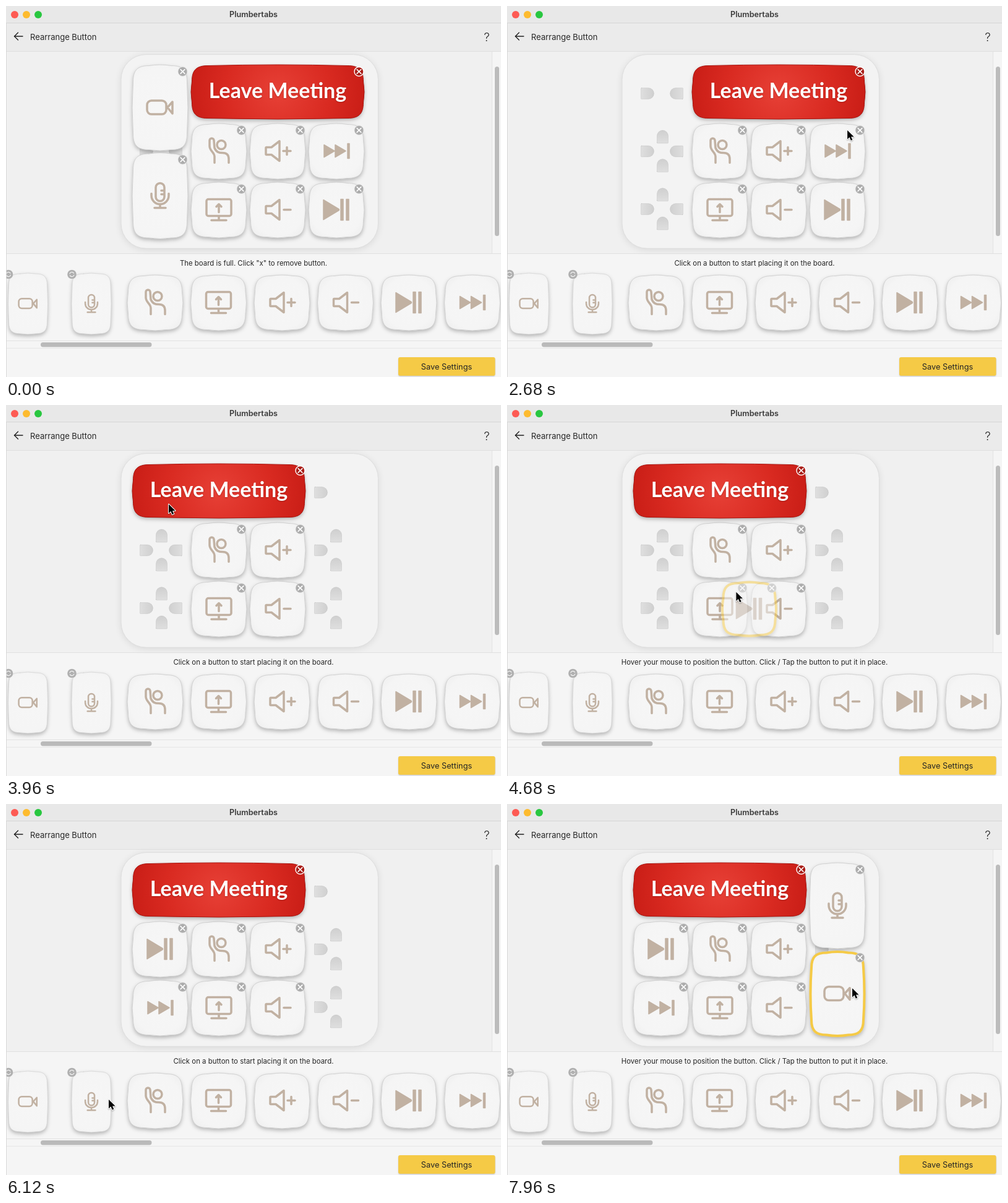
Write an HTML page with a canvas that moves like this. It is 800 by 600 pixels and loops after 8000 ms.

```html
<!DOCTYPE html>
<html lang="en">
<head>
<meta charset="utf-8">
<title>Plumbertabs</title>
<style>
  html, body { margin: 0; width: 100%; height: 100%; overflow: hidden; }
  canvas { display: block; width: 800px; height: 600px; }
</style>
</head>
<body>
<canvas id="stage" width="800" height="600"></canvas>
<script>
const stage = document.getElementById('stage').getContext('2d');
const overlay = new OffscreenCanvas(800, 600).getContext('2d');
let ctx = stage;

const LOOP = 8000, STEP = 95, BOARD_X = 204, BOARD_Y = 95;
const TAN = '#c1b1a2', YELLOW = '#f5ca46';
const UI = 'Inter, sans-serif';

const SPEAKER = 'M-18-6H-10L3-16V16L-10 6H-18a1 1 0 0 1-1-1V-5a1 1 0 0 1 1-1z';
const ICONS = {
  camera: 'M-14-11H3a7 7 0 0 1 7 7V4a7 7 0 0 1-7 7H-14a7 7 0 0 1-7-7V-4a7 7 0 0 1 7-7zM12 0L20-9V10z',
  mic: 'M-7-13a7 7 0 0 1 14 0V2a7 7 0 0 1-14 0zM-14-3V0a14 14 0 0 0 28 0V-3M0 14V20M-9 20H9M2-8H6M2-2H6',
  hand: 'M-15-17V-8C-15 0-7 2-7 9V19M-15-17a3.5 3.5 0 0 1 7 0L-7-5C-4 2 0 3 6 3 13 3 16 7 16 13V19' +
        'M11-10a7 7 0 1 1-14 0 7 7 0 1 1 14 0',
  screen: 'M-17-17H17a3 3 0 0 1 3 3V7a3 3 0 0 1-3 3H-17a3 3 0 0 1-3-3V-14a3 3 0 0 1 3-3z' +
          'M0 10V17M-12 17H12M0 4V-9M-4-5L0-9 4-5',
  plus: SPEAKER + 'M9 0H21M15-6V6',
  minus: SPEAKER + 'M10 0H21',
  play: 'M-21-16L4-1Q5 0 4 1L-21 16zM7-17h4v34h-4zM16-17h4v34h-4z',
  skip: 'M-20-10L-3 0-20 10zM-2-10L15 0-2 10zM18-12h3v24h-3z'
};
for (const name in ICONS) ICONS[name] = new Path2D(ICONS[name]);
const SOLID = ['play', 'skip'];
const ARROW = new Path2D('M0 0V14.5L3.4 11.3 5.7 16.6 8.3 15.5 6 10.4H10.6z');

// Size in board cells
const cellsWide = name => name === 'leave' ? 3 : 1;
const cellsHigh = name => name === 'camera' || name === 'mic' ? 1.5 : 1;

// name, column, row, visible from, visible until
const PLACED = [
  ['camera', 0, 0, 0, 1840], ['mic', 0, 1.5, 0, 2200],
  ['leave', 1, 0, 0, 3320], ['skip', 3, 1, 0, 2800], ['play', 3, 2, 0, 3040],
  ['hand', 1, 1, 0, LOOP], ['plus', 2, 1, 0, LOOP],
  ['screen', 1, 2, 0, LOOP], ['minus', 2, 2, 0, LOOP],
  ['leave', 0, 0, 3880, LOOP], ['play', 0, 1, 4960, LOOP],
  ['skip', 0, 2, 5840, LOOP], ['mic', 3, 0, 6840, LOOP]
];
const DRAGS = [
  ['leave', 3320, 3880], ['play', 4360, 4960], ['skip', 5520, 5840],
  ['mic', 6320, 6840], ['camera', 7380, LOOP]
];

// time, x, y and optional velocity in px per ms
const PATH = [
  [1280, 790, 330], [1740, 283, 103], [1880, 283, 103], [2120, 284, 245], [2280, 284, 245],
  [2680, 550, 201, .1, 0], [2780, 568, 199], [2840, 568, 199], [2980, 568, 293], [3060, 568, 293],
  [3280, 490, 152], [3360, 490, 152], [3560, 411, 153, -.55, 0], [3800, 250, 150], [3920, 250, 150],
  [4300, 650, 474], [4400, 650, 474], [4680, 371, 303, -.6, -.5], [4880, 248, 228], [5000, 248, 228],
  [5420, 741, 477], [5540, 741, 477], [5780, 246, 322], [5880, 246, 322],
  [6120, 166, 478], [6340, 163, 477], [6720, 536, 158], [6860, 536, 158],
  [7160, 98, 445, -.25, .1], [7320, 50, 474], [7420, 50, 474], [7860, 558, 298], [LOOP, 558, 298]
];

function cursorAt(t) {
  const i = Math.max(1, PATH.findIndex(p => p[0] >= t));
  const a = PATH[i - 1], b = PATH[i], d = b[0] - a[0];
  const s = Math.max(0, (t - a[0]) / d), s2 = s * s, s3 = s2 * s;
  const hermite = k => (2 * s3 - 3 * s2 + 1) * a[k] + (3 * s2 - 2 * s3) * b[k] +
    (s3 - 2 * s2 + s) * d * (a[k + 2] || 0) + (s3 - s2) * d * (b[k + 2] || 0);
  return [hermite(1), hermite(2)];
}

function rect(x, y, w, h, fill) {
  ctx.fillStyle = fill;
  ctx.fillRect(x, y, w, h);
}

function pill(x, y, w, h, r, fill) {
  ctx.beginPath();
  ctx.roundRect(x, y, w, h, r);
  ctx.fillStyle = fill;
  ctx.fill();
}

function disc(x, y, r, fill) {
  ctx.beginPath();
  ctx.arc(x, y, r, 0, 7);
  ctx.fillStyle = fill;
  ctx.fill();
}

function line(points, color, width) {
  ctx.beginPath();
  points.forEach(([x, y]) => ctx.lineTo(x, y));
  ctx.strokeStyle = color;
  ctx.lineWidth = width;
  ctx.stroke();
}

function label(text, x, y, font, color = '#262626', align = 'center') {
  ctx.font = font;
  ctx.fillStyle = color;
  ctx.textAlign = align;
  ctx.fillText(text, x, y);
}

function shadow(color, blur, dy) {
  ctx.shadowColor = color;
  ctx.shadowBlur = blur;
  ctx.shadowOffsetY = dy;
}

// Rounded box with slightly bulging sides
function squircle(x, y, w, h, r, b = 1.5) {
  const X = x + w, Y = y + h, k = r * .32;
  const p = new Path2D();
  p.moveTo(x + r, y + b);
  p.quadraticCurveTo(x + w / 2, y - b, X - r, y + b);
  p.bezierCurveTo(X - k, y + b, X - b, y + k, X - b, y + r);
  p.quadraticCurveTo(X + b, y + h / 2, X - b, Y - r);
  p.bezierCurveTo(X - b, Y - k, X - k, Y - b, X - r, Y - b);
  p.quadraticCurveTo(x + w / 2, Y + b, x + r, Y - b);
  p.bezierCurveTo(x + k, Y - b, x + b, Y - k, x + b, Y - r);
  p.quadraticCurveTo(x - b, y + h / 2, x + b, y + r);
  p.bezierCurveTo(x + b, y + k, x + k, y + b, x + r, y + b);
  p.closePath();
  return p;
}

function icon(name, x, y) {
  ctx.save();
  ctx.translate(x, y);
  ctx.lineJoin = ctx.lineCap = 'round';
  ctx.strokeStyle = ctx.fillStyle = TAN;
  const solid = SOLID.includes(name);
  ctx.lineWidth = solid ? 1.5 : 3.5;
  if (solid) ctx.fill(ICONS[name]);
  ctx.stroke(ICONS[name]);
  ctx.restore();
}

function closeBadge(x, y, onRed) {
  disc(x, y, 7.5, onRed ? '#a91d17' : '#acacac');
  ctx.strokeStyle = onRed ? '#fff' : '#e6e6e6';
  ctx.lineWidth = onRed ? 1.4 : .7;
  ctx.stroke();
  line([[x - 3.4, y - 3.4], [x + 3.4, y + 3.4]], '#fff', 1.5);
  line([[x - 3.4, y + 3.4], [x + 3.4, y - 3.4]], '#fff', 1.5);
}

function turnBadge(x, y) {
  disc(x, y, 7.3, '#b0b0b0');
  ctx.strokeStyle = '#f4f4f4';
  ctx.lineWidth = 1.2;
  for (const a of [.3, .3 + Math.PI]) {
    ctx.beginPath();
    ctx.arc(x, y, 3.6, a, a + 2.3);
    ctx.stroke();
  }
}

function buttonSize(name) {
  if (name === 'leave') return [280, 88];
  return [90, cellsHigh(name) > 1 ? 139 : 90];
}

function button(name, x, y, selected) {
  const red = name === 'leave';
  const [w, h] = buttonSize(name);
  const cx = x + w / 2, cy = y + h / 2;
  const shape = squircle(x, y, w, h, 27);
  const fill = ctx.createRadialGradient(cx, cy, 5, cx, cy, red ? 150 : h * .68);
  fill.addColorStop(0, red ? '#e63f35' : '#f6f6f6');
  fill.addColorStop(red ? .55 : .65, red ? '#d92a21' : '#f5f5f5');
  fill.addColorStop(1, red ? '#c71c15' : '#ededed');
  ctx.save();
  shadow('rgba(0,0,0,.27)', 6, 3);
  ctx.fillStyle = fill;
  ctx.fill(shape);
  ctx.restore();
  ctx.strokeStyle = red ? '#a9140f' : '#d2d2d2';
  ctx.lineWidth = 1;
  ctx.stroke(shape);
  if (red) {
    ctx.save();
    shadow('rgba(80,0,0,.35)', 2, 1);
    label('Leave Meeting', cx, y + 54, 'bold 34px Lato, sans-serif', '#fff');
    ctx.restore();
  } else {
    icon(name, cx, cy - .5);
  }
  if (selected) {
    ctx.strokeStyle = YELLOW;
    ctx.lineWidth = 4;
    ctx.stroke(squircle(x + 1.5, y + 1.5, w - 3, h - 3, 26));
  }
}

function boardButton(name, col, row, selected) {
  const x = BOARD_X + col * STEP, y = BOARD_Y + row * STEP;
  button(name, x, y, selected);
  closeBadge(x + cellsWide(name) * STEP - 13.5, y + 11, name === 'leave' && !selected);
}

function hole(x, y, angle) {
  ctx.save();
  ctx.translate(x, y);
  ctx.rotate(angle);
  const g = ctx.createLinearGradient(-11, 0, 11, 0);
  g.addColorStop(0, '#dfdfdf');
  g.addColorStop(1, '#cfcfcf');
  pill(-10.5, -9, 21, 18, [1, 9, 9, 1], g);
  ctx.strokeStyle = 'rgba(0,0,0,.07)';
  ctx.lineWidth = 1;
  ctx.stroke();
  ctx.restore();
}

function board() {
  ctx.save();
  shadow('rgba(0,0,0,.1)', 12, 2);
  pill(186, 78.5, 415.5, 313.5, 40, '#f3f3f3');
  ctx.restore();
  ctx.strokeStyle = '#dedede';
  ctx.lineWidth = 1;
  ctx.stroke();
  for (let col = 0; col < 4; col++) for (let row = 0; row < 3; row++) {
    const x = 251 + col * 94, y = 141.5 + row * 93.5;
    hole(x - 24, y, 0);
    if (col < 3) hole(x + 23, y, Math.PI);
    if (row) {
      hole(x + .5, y - 23.5, -Math.PI / 2);
      hole(x + .5, y + 23, -Math.PI / 2);
    }
  }
}

function windowFrame() {
  rect(0, 0, 800, 600, '#f5f5f5');
  rect(0, 0, 800, 27, '#e8e8e8');
  rect(0, 27, 800, 1, '#d6d6d6');
  rect(0, 28, 800, 45, '#ebebeb');
  rect(0, 73, 800, 327, '#f0f0f0');
  rect(0, 73, 800, 1, '#dfdfdf');
  rect(786, 74, 14, 326, '#f5f5f5');
  rect(785, 74, 1, 326, '#e3e3e3');
  pill(790, 98, 7, 274, 3.5, '#bcbcbc');
  disc(14, 14, 6, '#fd5b54');
  disc(33, 14, 6, '#fdbb2f');
  disc(52, 14, 6, '#29c740');
  label('Plumbertabs', 400, 18, '600 12.7px ' + UI, '#3a3a3a');
  ctx.lineCap = ctx.lineJoin = 'round';
  line([[27, 49], [13.5, 49]], '#222', 1.4);
  line([[19.5, 43], [13.5, 49], [19.5, 55]], '#222', 1.4);
  label('Rearrange Button', 39, 55, '13px ' + UI, '#262626', 'left');
  label('?', 777, 57, '300 19px ' + UI);
}

function tray() {
  rect(0, 400, 800, 1, '#e0e0e0');
  ['camera', 'mic'].forEach((name, i) => {
    ctx.save();
    ctx.translate(3.5 + i * 102.5, 432);
    ctx.scale(.712, .712);
    button(name, 0, 0);
    ctx.restore();
    turnBadge(4 + i * 102.5, 434);
  });
  ['hand', 'screen', 'plus', 'minus', 'play', 'skip'].forEach((name, i) => button(name, 196 + i * 102.5, 435));
  rect(0, 541, 800, 1, '#e2e2e2');
  rect(0, 553, 800, 1, '#e6e6e6');
  pill(56, 544, 179.5, 7.5, 3.7, '#bababa');
  ctx.save();
  shadow('rgba(0,0,0,.2)', 2, 1);
  pill(634, 568, 156.5, 30, 3, YELLOW);
  ctx.restore();
  label('Save Settings', 712, 588, '12.8px ' + UI);
  rect(0, 28, 1, 572, '#d9d9d9');
}

const visible = t => PLACED.filter(p => t >= p[3] && t < p[4]);

function isFree(name, col, row, t) {
  const w = cellsWide(name), h = cellsHigh(name);
  return col + w <= 4 && row + h <= 3 && visible(t).every(([n, c, r]) =>
    col >= c + cellsWide(n) || c >= col + w || row >= r + cellsHigh(n) || r >= row + h);
}

// The held button trails the cursor a little and snaps to half cells
function heldButton(name, t) {
  const [x, y] = cursorAt(t - 50);
  if (y > 395) return;
  const high = cellsHigh(name);
  const snap = (v, max) => Math.min(max, Math.max(0, Math.round(v / (STEP / 2)))) / 2;
  const col = snap(x - 250, 6);
  const row = snap(y - (high > 1 ? 165 : 140), 6 - 2 * high);
  ctx = overlay;
  ctx.clearRect(0, 0, 800, 600);
  ctx.lineCap = 'round';
  boardButton(name, col, row, true);
  ctx = stage;
  ctx.globalAlpha = isFree(name, col, row, t) ? 1 : .5;
  ctx.drawImage(overlay.canvas, 0, 0);
  ctx.globalAlpha = 1;
}

function message(t, drag) {
  if (t < 1840) return 'The board is full. Click "x" to remove button.';
  if (drag && drag[0] !== 'leave')
    return 'Hover your mouse to position the button. Click / Tap the button to put it in place.';
  return 'Click on a button to start placing it on the board.';
}

function pointer(t) {
  if (t < PATH[0][0]) return;
  ctx.save();
  ctx.translate(...cursorAt(t));
  ctx.lineJoin = 'round';
  ctx.strokeStyle = '#fff';
  ctx.lineWidth = 2;
  shadow('rgba(0,0,0,.3)', 2, 1);
  ctx.stroke(ARROW);
  ctx.shadowColor = 'transparent';
  ctx.fillStyle = '#000';
  ctx.fill(ARROW);
  ctx.restore();
}

function draw(t) {
  const drag = DRAGS.find(d => t >= d[1] && t < d[2]);
  windowFrame();
  board();
  visible(t).forEach(([name, col, row]) => boardButton(name, col, row));
  tray();
  label(message(t, drag), 400, 420, '11.4px ' + UI);
  if (drag) heldButton(drag[0], t);
  pointer(t);
}

const start = performance.now();
function tick() {
  draw((performance.now() - start) % LOOP);
  requestAnimationFrame(tick);
}
tick();
</script>
</body>
</html>
```
